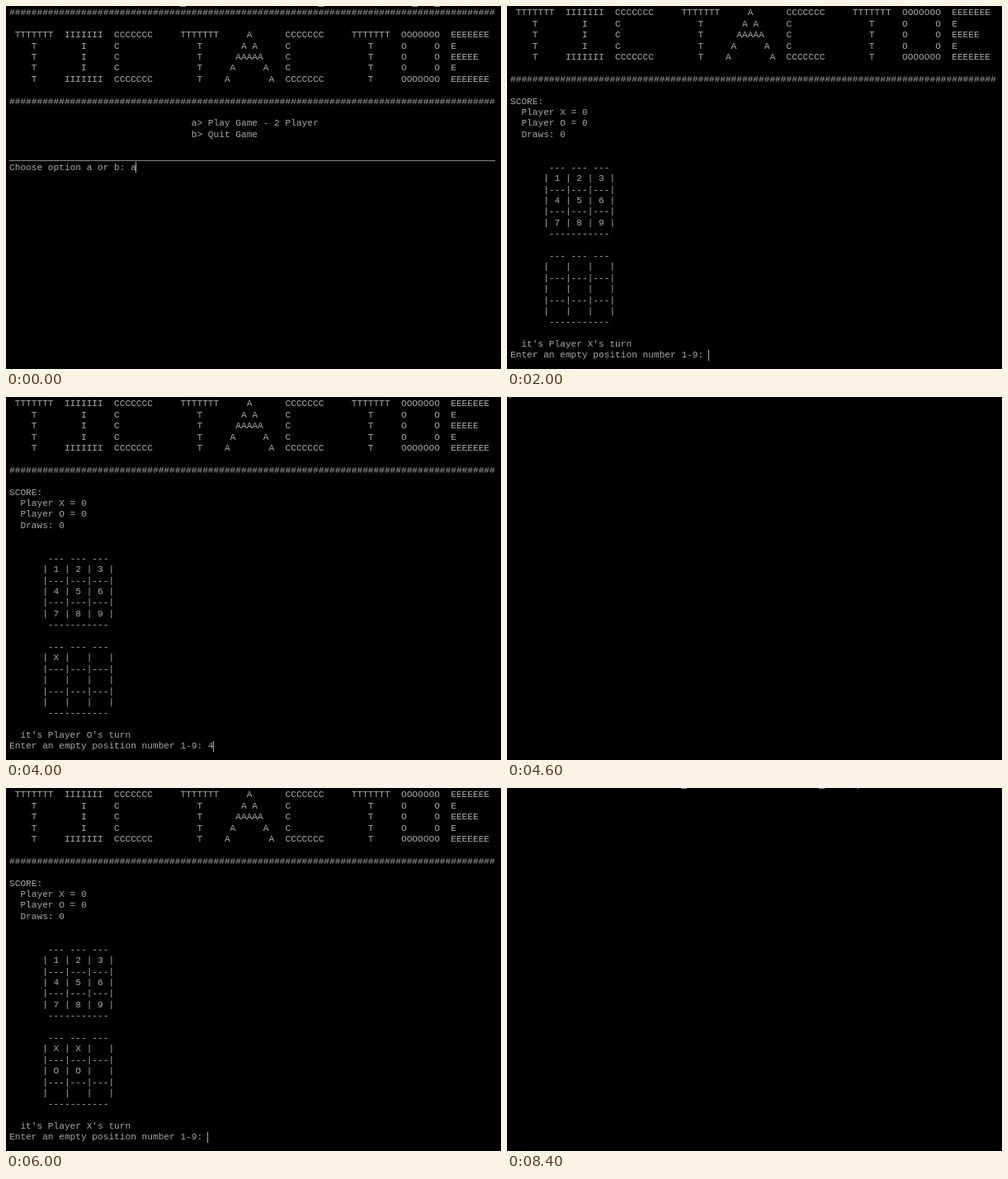
Write an HTML page with a canvas that moves like this. It is 600 px wide and 440 px high and loops after 8.6 s.

```html
<!DOCTYPE html>
<html lang="en">
<head>
<meta charset="utf-8">
<title>Console tic tac toe</title>
<style>
  html, body { margin: 0; width: 100%; height: 100%; overflow: hidden; background: #000; }
  canvas { display: block; }
</style>
</head>
<body>
<canvas id="stage" width="600" height="440"></canvas>
<script>
const ctx = document.getElementById('stage').getContext('2d');
const LOOP = 8600;
const CELL = 6.69, LINE = 13.39, LEFT = 4, TOP = -11.9;
const ROWS = 33;              // the topmost row is almost fully cut off
const INK = '#a8a8a8', RULE_INK = '#888';

// Builds a line from [column, text] pairs.
const at = (...parts) =>
  parts.reduce((line, [col, text]) => line.padEnd(col) + text, '');

const rule = '#'.repeat(88);
const wide = letter => letter.repeat(7);

function bannerRow(row) {
  const edge = row === 0 || row === 4;
  const bar = (col, letter) => edge ? [col, wide(letter)] : [col, letter];
  const stem = (col, letter) => edge ? [col, wide(letter)] : [col + 3, letter];
  const tee = col => row === 0 ? [col, wide('T')] : [col + 3, 'T'];
  const peak = row === 0 ? [[43, 'A']]
    : row === 2 ? [[41, 'AAAAA']]
    : [[43 - row, 'A'], [43 + row, 'A']];
  return at(tee(1), stem(10, 'I'), bar(19, 'C'),
            tee(31), ...peak, bar(50, 'C'),
            tee(62), edge ? [71, wide('O')] : [71, 'O     O'],
            row === 2 ? [80, 'EEEEE'] : bar(80, 'E'));
}

const banner = [rule, '', ...[0, 1, 2, 3, 4].map(bannerRow), '', rule, ''];

function board(cells) {
  const row = i => at([6, '| ' + [...cells.slice(i, i + 3)].join(' | ') + ' |']);
  const split = at([6, '|---|---|---|']);
  return [at([7, '--- --- ---']), row(0), split, row(3), split, row(6), at([7, '-'.repeat(11)])];
}

const score = wins => ['SCORE:', `  Player X = ${wins}`, '  Player O = 0', '  Draws: 0', '', ''];

const turn = (cells, player, typed = '') => [
  ...banner, ...score(0), ...board('123456789'), '', ...board(cells.padEnd(9)), '',
  `  it's Player ${player}'s turn`,
  'Enter an empty position number 1-9: ' + typed
];

const shell = at([31, '_'], [56, '_'], [63, '']);
const menu = [
  at([0, shell], [73, '_'], [77, '_']), ...banner,
  at([33, 'a> Play Game - 2 Player']), at([33, 'b> Quit Game']), '',
  '_'.repeat(88), 'Choose option a or b: a'
];

const result = (answer = '') => [
  ...turn('XX OO', 'X', '3'), ...board('XXXOO'.padEnd(9)),
  '   Player X has won!', '   GAME HAS ENDED', '',
  ...score(1), 'Do you want a rematch Y/N? ' + answer
];

const emptyTop = [''];
const emptyBottom = Array(ROWS).fill('');

const timeline = [
  [0, menu],
  [400, [...menu, '']],
  [600, [...menu, '', '', '', '', '']],
  [1000, emptyTop],
  [1200, turn('', 'X')],
  [3000, turn('', 'X', '1')],
  [3600, turn('X', 'O')],
  [4000, turn('X', 'O', '4')],
  [4600, emptyTop],
  [4800, turn('X  O', 'X')],
  [5200, turn('X  O', 'X', '2')],
  [5400, emptyBottom],
  [5600, turn('XX O', 'O')],
  [5800, turn('XX O', 'O', '5')],
  [6000, turn('XX OO', 'X')],
  [6200, turn('XX OO', 'X', '3')],
  [6400, result()],
  [8000, result('N')],
  [8400, [shell]]
];

function drawChar(char, x, top) {
  if (char === '_') {
    ctx.fillStyle = RULE_INK;
    ctx.fillRect(Math.floor(x), Math.floor(top + 12), 7, 1);
  } else if (char !== ' ') {
    ctx.fillStyle = INK;
    ctx.fillText(char, x, Math.round(top + 9.9));
  }
}

function paint(lines) {
  const visible = lines.slice(-ROWS);
  ctx.fillStyle = '#000';
  ctx.fillRect(0, 0, 600, 440);
  ctx.font = '11.15px "Liberation Mono", monospace';
  visible.forEach((line, row) =>
    [...line].forEach((char, col) => drawChar(char, LEFT + col * CELL, TOP + row * LINE)));
  // The cursor always follows the last character.
  const last = visible.length - 1;
  ctx.fillStyle = INK;
  ctx.fillRect(Math.floor(LEFT + visible[last].length * CELL - 0.3),
               Math.round(TOP + last * LINE), 1, 13);
}

let shown;
function tick() {
  const time = performance.now() % LOOP;
  const lines = timeline.findLast(([start]) => start <= time)[1];
  if (lines !== shown) paint(shown = lines);
  requestAnimationFrame(tick);
}
tick();
</script>
</body>
</html>
```
